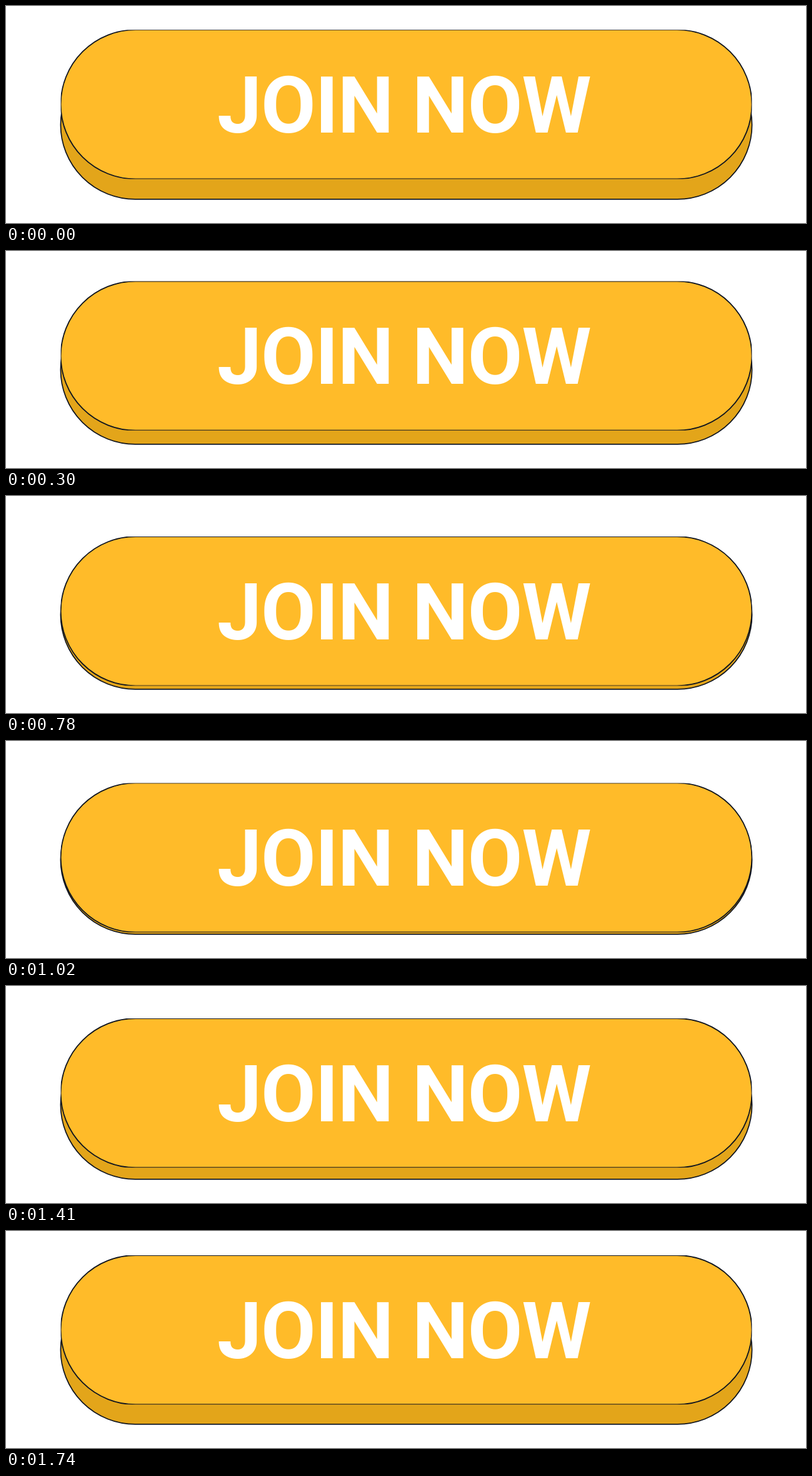
An HTML page with a canvas that plays this animation: 1280x348 px, repeating every 1.77 s.

```html
<!DOCTYPE html>
<html lang="en">
<head>
<meta charset="utf-8">
<title>Join now</title>
<style>
  html, body { margin: 0; width: 100%; height: 100%; overflow: hidden; background: #fff; }
  canvas { display: block; width: 1280px; height: 348px; }
</style>
</head>
<body>
<canvas id="stage" width="1280" height="348"></canvas>
<script>
const ctx = document.getElementById('stage').getContext('2d');
const LOOP = 1770, STEP = 30, PRESSED = 940, RELEASED = 1760, TRAVEL = 32.4;
const INK = '#10151f';

// Linear press, then a slightly faster linear release.
function pressDepth(ms) {
  return ms < PRESSED
    ? TRAVEL * ms / PRESSED
    : TRAVEL * (RELEASED - ms) / (RELEASED - PRESSED);
}

function pill(x, y, w, h, fill, line) {
  ctx.beginPath();
  ctx.roundRect(x, y, w, h, h / 2);
  ctx.fillStyle = fill;
  ctx.fill();
  ctx.lineWidth = line;
  ctx.strokeStyle = INK;
  ctx.stroke();
}

function drawFace(dy) {
  const x = 87.6, y = 38.2, w = 1105.8, h = 239.2;
  ctx.save();
  ctx.translate(0, dy);

  // The straight edges show only the inner half of the outline.
  ctx.save();
  ctx.beginPath();
  ctx.rect(x, y, w, h);
  ctx.clip();
  pill(x, y, w, h, '#ffbb29', 1.8);
  ctx.restore();

  ctx.font = 'bold 127px Roboto, sans-serif';
  ctx.letterSpacing = '-1px';
  ctx.fillStyle = '#fff';
  ctx.fillText('JOIN NOW', 338, 203);
  ctx.restore();
}

function draw(now) {
  const ms = Math.floor(now % LOOP / STEP) * STEP;
  ctx.fillStyle = '#fff';
  ctx.fillRect(0, 0, 1280, 348);
  pill(87.4, 71.2, 1106.2, 238.6, '#e3a51a', 1.7);
  drawFace(pressDepth(ms));
}

const start = performance.now();
function tick() {
  draw(performance.now() - start);
  requestAnimationFrame(tick);
}
tick();
</script>
</body>
</html>
```
